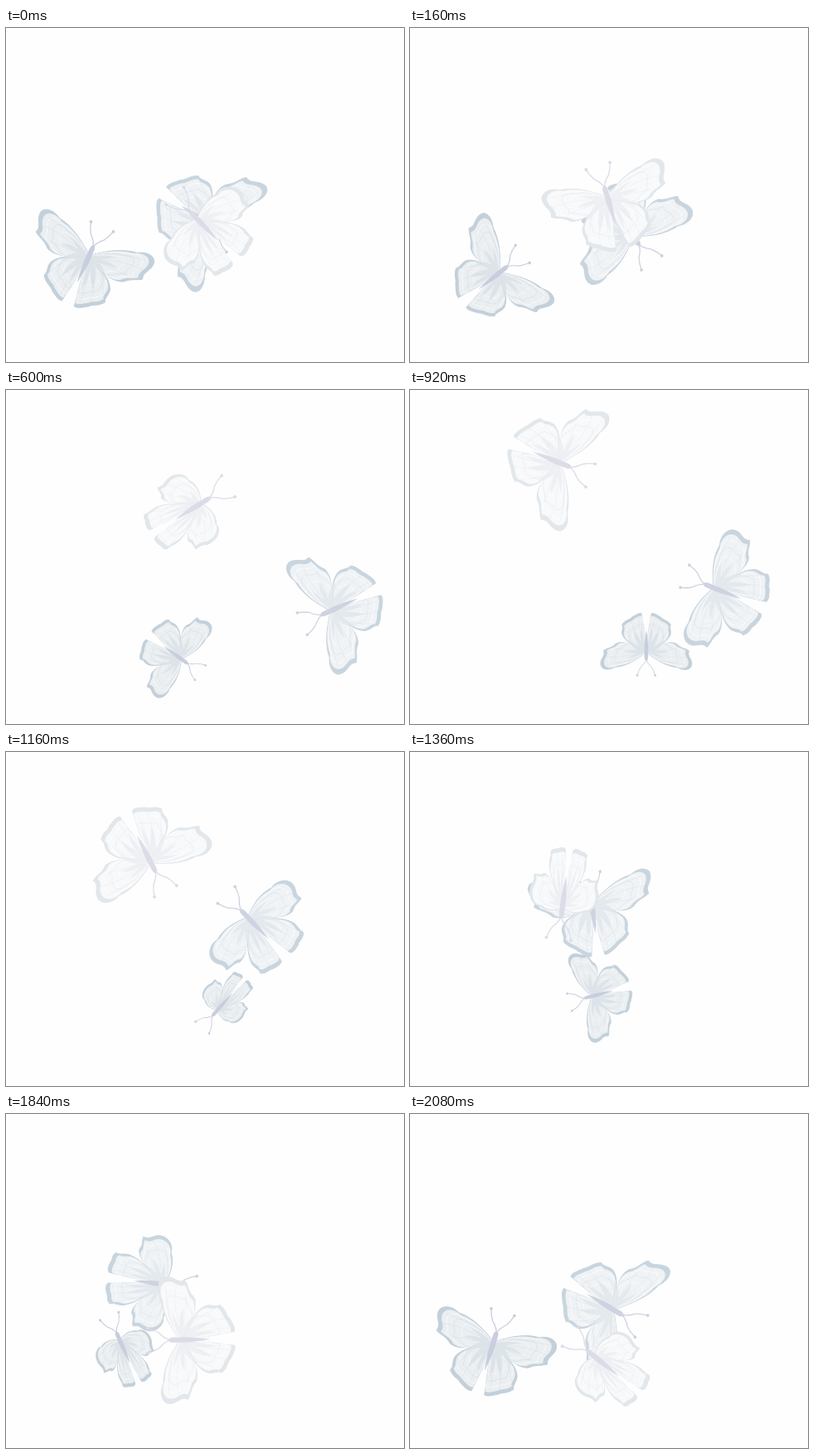
Write an HTML page with a canvas that moves like this. It is 480x403 px and loops after 2120 ms.

```html
<!DOCTYPE html>
<html lang="en">
<head>
<meta charset="utf-8">
<title>Butterflies</title>
<style>
html, body { margin: 0; width: 100%; height: 100%; overflow: hidden; background: #fefefe; }
canvas { display: block; }
</style>
</head>
<body>
<canvas id="stage" width="480" height="403"></canvas>
<script>
const LOOP = 2120, STEP = 40, BEATS = 3, TURN = 2 * Math.PI;
const TIMES = [0, 360, 600, 920, 1160, 1600, 2080];
const ctx = document.getElementById('stage').getContext('2d');

// Right-hand wing, rooted at the thorax, head pointing up
const fore = new Path2D('M2-8C14-14 34-25 56-22C70-27 84-20 82-8C81 0 73 3 77 12C70 16 63 13 55 20C42 24 26 12 3-2Z');
const hind = new Path2D('M3-1C18 8 36 17 43 33C46 41 40 47 44 52C38 60 31 57 26 62C20 64 14 68 9 65C8 52 2 30 1 6Z');
const rays = new Path2D('M2-6Q18-12 36-11Q22-7 17-4Q30-4 41 4Q26 2 17 1Q28 10 33 23Q22 12 14 8Q22 22 22 38Q13 22 9 13Q12 30 9 42Q5 22 2 6Z');
const veins = new Path2D('M18-12Q40-17 70-14M24-5Q48-8 72 0M22 2Q40 6 56 11M20 14Q32 24 37 42M14 18Q24 34 26 54M8 18Q13 36 14 58');
const body = new Path2D('M0-20C4-19 3-13 3-8C4 2 2 18 0 31C-2 18-4 2-3-8C-3-13-4-19 0-20Z');
const feelers = new Path2D('M0-18Q-2-25-9-31Q-13-37-15-45M0-18Q2-25 9-31Q13-37 15-45');

// heading: degrees at the start; sway: uneven turning; near: growth when closest;
// beat: point of the wingbeat at which the wings are raised
const flock = [
  { edge: '#c3d0da', fill: '#ebeff1', vein: '#d0d9e1', body: '#c9cddd',
    heading: -66, sway: 0, size: .72, near: .26, beat: .64,
    path: [[98, 280], [122, 318], [208, 322], [285, 312], [258, 308], [180, 278], [99, 281]] },
  { edge: '#c9d5de', fill: '#f0f3f5', vein: '#d9dfe7', body: '#cfd2e0',
    heading: 42, sway: 14, size: .97, near: .04, beat: .51,
    path: [[237, 232], [308, 262], [397, 264], [372, 241], [296, 204], [157, 185], [240, 233]] },
  { edge: '#e2e7eb', fill: '#f8f9fa', vein: '#e5e8ed', body: '#dcdce8',
    heading: 226, sway: 0, size: 1, near: 0, beat: .9,
    path: [[235, 235], [243, 178], [230, 140], [176, 86], [172, 128], [203, 240], [228, 297]] }
];

// Smooth curve through the waypoints, with tangents from their neighbours
function pointAt(path, time) {
  const last = TIMES.length - 1, t = Math.min(time, TIMES[last]);
  const i = Math.min(TIMES.findLastIndex(k => k <= t), last - 1);
  const span = TIMES[i + 1] - TIMES[i], u = (t - TIMES[i]) / span;
  const slope = (k, c) => {
    const a = Math.max(k - 1, 0), b = Math.min(k + 1, last);
    return (path[b][c] - path[a][c]) / (TIMES[b] - TIMES[a]) * span;
  };
  return path[i].map((p, c) => {
    const q = path[i + 1][c], m = slope(i, c), n = slope(i + 1, c);
    return p + u * (m + u * (3 * (q - p) - 2 * m - n + u * (2 * (p - q) + m + n)));
  });
}

// One full turn and a few wingbeats per loop
function poseAt(bug, time) {
  const turn = time / LOOP * TURN;
  const lift = Math.cos(BEATS * turn - bug.beat * TURN);
  return {
    angle: turn + (bug.heading + 90 - bug.sway * Math.cos(2 * turn - 1)) * Math.PI / 180,
    size: bug.size + bug.near * ((1 + Math.cos(turn)) / 2) ** 6,
    spread: 1 - .48 * Math.max(0, lift) ** 4,
    sweep: .05 - .3 * lift
  };
}

function scaled(k, draw) {
  ctx.save();
  ctx.scale(k, k);
  draw();
  ctx.restore();
}

function fill(path, color) {
  ctx.fillStyle = color;
  ctx.fill(path);
}

function stroke(path, color, width) {
  ctx.strokeStyle = color;
  ctx.lineWidth = width;
  ctx.stroke(path);
}

function drawWing(bug) {
  for (const part of [hind, fore]) {
    fill(part, bug.edge);
    stroke(part, bug.edge, 1.2);
    scaled(.925, () => fill(part, bug.fill));
    ctx.setLineDash([7, 2, 3, 2]);
    for (const k of [.83, .7, .56]) {
      scaled(k, () => stroke(part, k === .7 ? bug.vein : '#fff', .9));
    }
    ctx.setLineDash([]);
  }
  ctx.globalAlpha = .5;
  stroke(veins, bug.vein, .8);
  fill(rays, bug.vein);
  ctx.globalAlpha = 1;
}

function drawButterfly(bug, time) {
  const { angle, size, spread, sweep } = poseAt(bug, time);
  ctx.save();
  ctx.translate(...pointAt(bug.path, time));
  ctx.rotate(angle);
  ctx.scale(size, size);
  for (const side of [-1, 1]) {
    ctx.save();
    ctx.transform(side * spread, -sweep, 0, 1, 0, 0);
    scaled(.93, () => drawWing(bug));
    ctx.restore();
  }
  stroke(feelers, bug.body, 1.3);
  fill(body, bug.body);
  for (const side of [-1, 1]) {
    ctx.beginPath();
    ctx.arc(side * 15, -45, 1.9, 0, TURN);
    ctx.fill();
  }
  ctx.restore();
}

function frame() {
  const time = Math.floor(performance.now() % LOOP / STEP) * STEP;
  ctx.fillStyle = '#fefefe';
  ctx.fillRect(0, 0, 480, 403);
  ctx.lineCap = ctx.lineJoin = 'round';
  flock.forEach(bug => drawButterfly(bug, time));
  requestAnimationFrame(frame);
}
frame();
</script>
</body>
</html>
```
